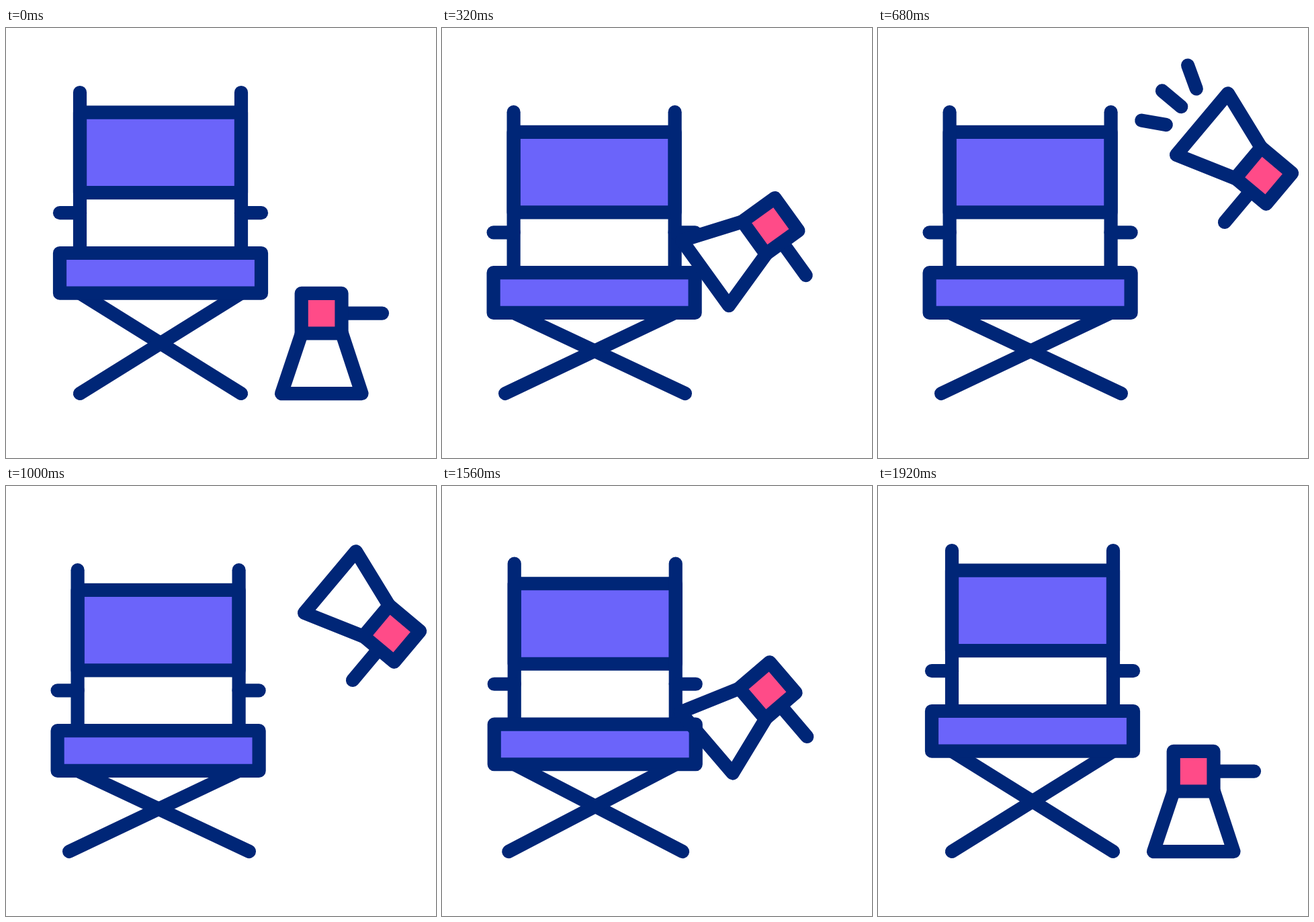
An HTML page with a canvas that plays this animation: 640 px wide and 640 px high, repeating every 2000 ms.

```html
<!DOCTYPE html>
<html lang="en">
<head>
<meta charset="utf-8">
<title>Director's chair and megaphone</title>
<style>
  html, body { margin: 0; width: 100%; height: 100%; overflow: hidden; background: #fff; }
  canvas { display: block; width: 100vmin; height: 100vmin; margin: auto; }
</style>
</head>
<body>
<canvas id="stage"></canvas>
<script>
const SIZE = 640, LOOP = 2000;
const NAVY = '#002677', PURPLE = '#6b64fa', PINK = '#ff4b88';
const canvas = document.getElementById('stage');
const ctx = canvas.getContext('2d');

const clamp = v => Math.min(1, Math.max(0, v));
const smooth = p => p * p * (3 - 2 * p);
const phase = (t, start, end) => clamp((t - start) / (end - start));
const mix = (a, b, p) => a + (b - a) * p;

// cubic-bezier(1/6, 0, 5/6, 1)
function softEase(x) {
  let lo = 0, hi = 1;
  for (let i = 0; i < 24; i++) {
    const s = (lo + hi) / 2, r = 1 - s;
    if (0.5 * s * r * r + 2.5 * s * s * r + s * s * s < x) lo = s;
    else hi = s;
  }
  return smooth(lo);
}

function line(...points) {
  ctx.beginPath();
  for (let i = 0; i < points.length; i += 2) ctx.lineTo(points[i], points[i + 1]);
  ctx.stroke();
}

function panel(x, y, w, h, color) {
  ctx.fillStyle = color;
  ctx.fillRect(x, y, w, h);
  ctx.strokeRect(x, y, w, h);
}

// drop: 0 = standing tall, 1 = sunk with the legs spread
function drawChair(drop) {
  const dx = -3.4 * drop, dy = 29.2 * drop;
  line(110 + dx, 394.7 + dy, mix(350, 362, drop), 544);
  line(350 + dx, 394.7 + dy, mix(110, 94, drop), 544);

  ctx.save();
  ctx.translate(dx, dy);
  panel(110, 125.7, 240, 119.5, PURPLE);
  line(110, 96, 110, 335);
  line(350, 96, 350, 335);
  line(80, 275.2, 110, 275.2);
  line(350, 275.2, 380, 275.2);
  panel(80, 335, 300, 59.7, PURPLE);
  ctx.restore();
}

// Turns around the end of the handle while that point rises in a straight line.
function drawMegaphone(lift, grow, fade) {
  ctx.save();
  ctx.translate(mix(560, 516, lift), mix(424.6, 289, lift));
  ctx.rotate(130 * lift * Math.PI / 180);
  line(0, 0, -60, 0);
  line(-120, 30, -150, 119.5, -30.5, 119.5, -60, 30);
  panel(-120.3, -29.8, 59.8, 59.7, PINK);

  if (grow > fade) {
    for (const side of [-1, 0, 1]) {
      ctx.save();
      ctx.translate(-90 + side * 35, 160);
      ctx.rotate(-side * Math.PI / 6);
      line(0, 50 * fade, 0, 50 * grow);
      ctx.restore();
    }
  }
  ctx.restore();
}

function draw(t) {
  const k = canvas.width / SIZE;
  ctx.setTransform(k, 0, 0, k, 0, 0);
  ctx.fillStyle = '#fff';
  ctx.fillRect(0, 0, SIZE, SIZE);
  ctx.strokeStyle = NAVY;
  ctx.lineWidth = 20.2;
  ctx.lineCap = ctx.lineJoin = 'round';

  const drop = smooth(phase(t, 80, 240)) - smooth(phase(t, 1360, 1880));
  const lift = smooth(phase(t, 160, 520)) - softEase(phase(t, 1320, 1720));
  drawChair(drop);
  drawMegaphone(lift, smooth(phase(t, 520, 760)), smooth(phase(t, 760, 1000)));
}

function resize() {
  const side = Math.min(innerWidth, innerHeight) || SIZE;
  canvas.width = canvas.height = Math.round(side * (devicePixelRatio || 1));
}

const begin = performance.now();
function tick() {
  const t = (performance.now() - begin) % LOOP;
  draw(Math.floor(t / 40) * 40);
  requestAnimationFrame(tick);
}

addEventListener('resize', resize);
resize();
tick();
</script>
</body>
</html>
```
